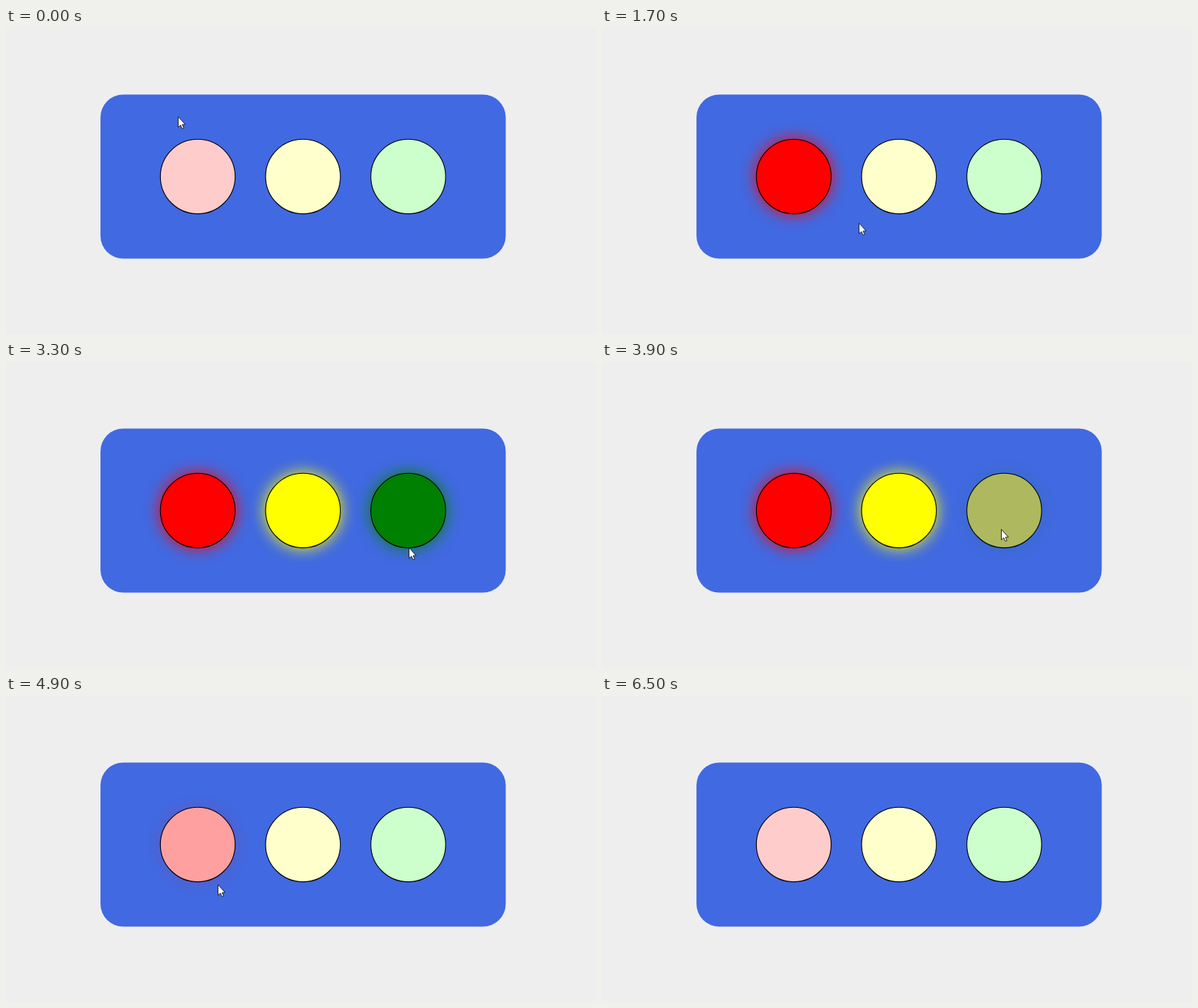
Write an HTML page that moves like this. It is 800x416 px and loops after 6600 ms.

```html
<!DOCTYPE html>
<html lang="en">
<head>
<meta charset="utf-8">
<title>Three lamps</title>
<style>
  html, body { margin: 0; width: 100%; height: 100%; overflow: hidden; background: #eee; }
  svg { display: block; }
  .glow { filter: blur(10.5px); }
  .disc { stroke: #000; stroke-width: 1.1px; }
  #cursor { fill: #fff; stroke: #111; stroke-width: .9px; }
</style>
</head>
<body>
<svg width="800" height="416" viewBox="0 0 800 416">
  <rect x="128.1" y="90.4" width="549.5" height="223.2" rx="31" fill="#4169e1"/>
  <g id="lamps"></g>
  <g id="cursor"><path d="M-.5 -.4V13.9L2.7 11L4.9 15.7L7.1 14.8L5 10.2H9.1Z"/></g>
</svg>
<script>
const LOOP = 6600, STEP = 100, FADE = 300, EXIT = 5000;
const RADIUS = 50.7, SPACING = 142.7;
const group = document.getElementById('lamps');
const cursor = document.getElementById('cursor');

// Each lamp fades on with ease, and off by way of a middle tone.
const lamps = [
  { dim: '#ffcccc', lit: '#ff0000', via: '#ffa0a0', on: 520, off: 4750 },
  { dim: '#ffffcc', lit: '#ffff00', via: '#ffff99', on: 2070, off: 4250 },
  { dim: '#ccffcc', lit: '#008000', via: '#aeb85f', on: 2830, off: 3750 }
];

// Pointer stops: time, x, y
const stops = [
  [0, 234, 121], [400, 264, 207], [800, 264, 207], [1500, 330, 275],
  [2100, 412, 235], [2300, 426, 238], [2800, 535, 226], [3300, 547, 253],
  [3900, 542, 228], [4700, 262, 211], [4900, 288, 257], [EXIT, 300, 296]
];

const at = (time, style, easing = 'linear') => ({ offset: time / LOOP, easing, ...style });

function pausedLoop(el, frames) {
  const anim = el.animate(frames, { duration: LOOP, fill: 'both' });
  anim.pause();
  return anim;
}

function circle(className, index) {
  const el = document.createElementNS('http://www.w3.org/2000/svg', 'circle');
  el.setAttribute('class', className);
  el.setAttribute('cx', 260 + index * SPACING);
  el.setAttribute('cy', 201.9);
  el.setAttribute('r', RADIUS);
  group.append(el);
  return el;
}

function pulse(el, { on, off }, dim, via, lit) {
  return pausedLoop(el, [
    at(0, dim), at(on, dim, 'ease'), at(on + FADE, lit),
    at(off, lit), at(off + FADE / 2, via), at(off + FADE, dim), at(LOOP, dim)
  ]);
}

const anims = lamps.flatMap((lamp, i) => {
  const glow = circle('glow', i), disc = circle('disc', i);
  glow.style.fill = lamp.lit;
  const tones = [lamp.dim, lamp.via, lamp.lit].map(fill => ({ fill }));
  const levels = [0, 0.15, 1].map(opacity => ({ opacity }));
  return [pulse(glow, lamp, ...levels), pulse(disc, lamp, ...tones)];
});

const moves = stops.map(([t, x, y]) => at(t, { transform: `translate(${x}px, ${y}px)` }, 'ease-in-out'));
moves.push({ ...moves.at(-1), offset: 1 });
anims.push(pausedLoop(cursor, moves));

const start = performance.now();
function draw() {
  const elapsed = (performance.now() - start) % LOOP;
  const time = Math.floor(elapsed / STEP) * STEP;
  for (const anim of anims) anim.currentTime = time;
  cursor.style.visibility = time > EXIT ? 'hidden' : 'visible';
  requestAnimationFrame(draw);
}
draw();
</script>
</body>
</html>
```
